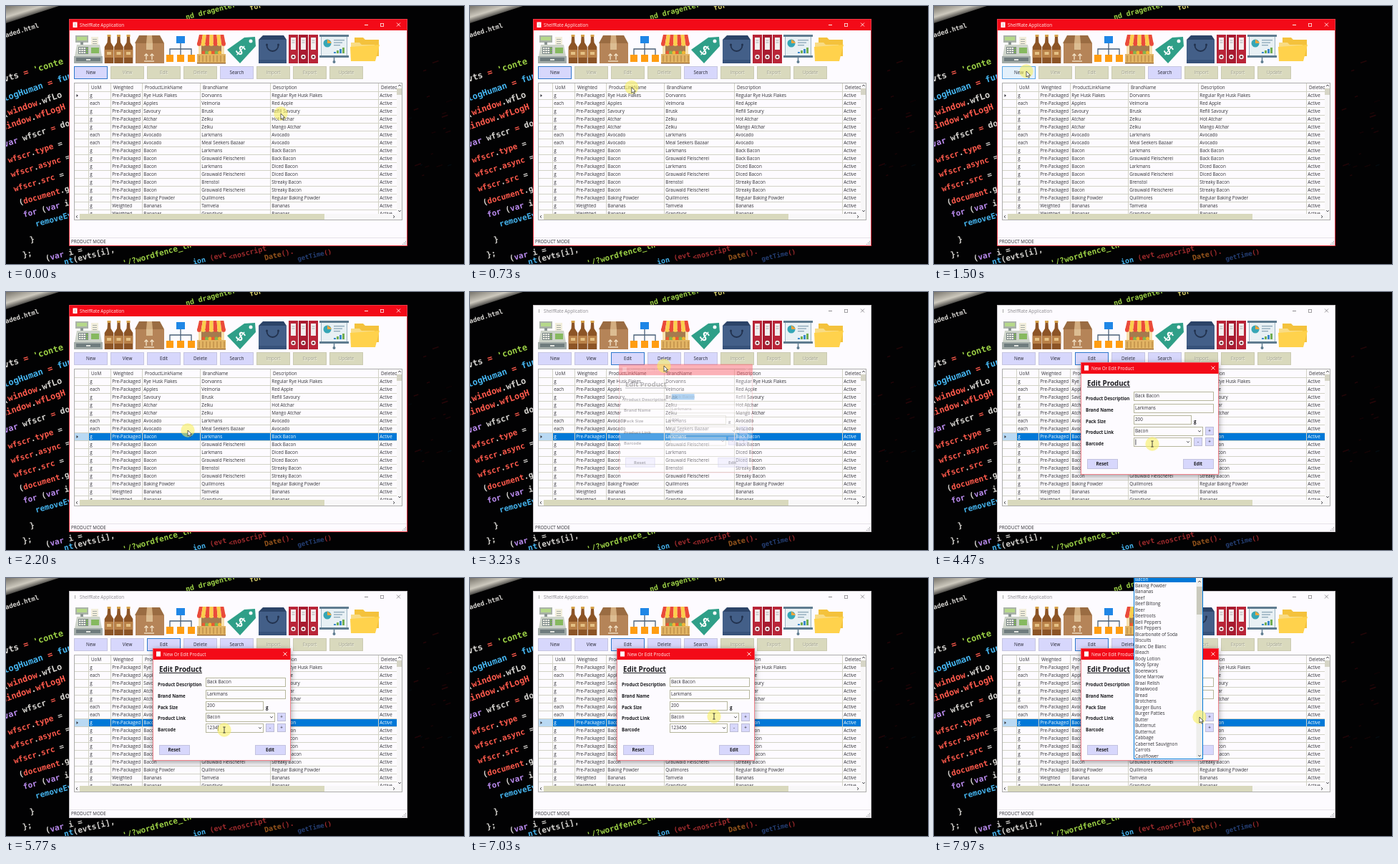
Write an HTML page with a canvas that moves like this. It is 640 by 360 pixels and loops after 8000 ms.

```html
<!DOCTYPE html>
<html lang="en">
<head>
<meta charset="utf-8">
<title>Price list editor</title>
<style>
  html, body { margin: 0; width: 100%; height: 100%; overflow: hidden; background: #020203; }
  canvas { display: block; width: 100vw; height: 100vh; }
</style>
</head>
<body>
<canvas id="stage" width="640" height="360"></canvas>
<script>
const ctx = document.getElementById('stage').getContext('2d');
const LOOP = 8000;
const SANS = '"Open Sans", "Noto Sans", sans-serif';
const MONO = '"DejaVu Sans Mono", "Noto Sans Mono", monospace';
const INK = '#303034', WHITE = '#fdfbff', RED = '#f30a18', LILAC = '#d7d7fc',
      KHAKI = '#d9d9bd', LINE = '#d2d2c6', BLUE = '#0078d7';

const T = { rowClick: 2120, editClick: 3080, dialog: 3150, fieldClick: 4330,
            type: 4900, key: 220, listOpen: 7660 };

// Pointer stops: time, x, y
const PATH = [
  [0, 384, 150], [150, 384, 150], [1150, 129, 91], [1560, 129, 91], [2040, 254, 193],
  [2400, 254, 193], [2850, 226, 94], [3120, 226, 94], [3230, 271, 103], [3600, 300, 150],
  [4200, 305, 212], [6550, 305, 212], [7030, 341, 193], [7400, 371, 194], [8000, 371, 194]
];

function box(x, y, w, h, color) {
  ctx.fillStyle = color;
  ctx.fillRect(x, y, w, h);
}
function frame(x, y, w, h, color, width = 1) {
  ctx.strokeStyle = color;
  ctx.lineWidth = width;
  ctx.strokeRect(x + width / 2, y + width / 2, w - width, h - width);
}
function shape(color, ...pts) {
  ctx.fillStyle = color;
  ctx.beginPath();
  for (let i = 0; i < pts.length; i += 2) ctx.lineTo(pts[i], pts[i + 1]);
  ctx.fill();
}
function line(color, width, ...pts) {
  ctx.strokeStyle = color;
  ctx.lineWidth = width;
  ctx.beginPath();
  for (let i = 0; i < pts.length; i += 2) ctx.lineTo(pts[i], pts[i + 1]);
  ctx.stroke();
}
function disc(x, y, r, color) {
  ctx.fillStyle = color;
  ctx.beginPath();
  ctx.arc(x, y, r, 0, 7);
  ctx.fill();
}
// y is the middle of the capitals
function text(str, x, y, color = INK, size = 6.3, weight = 400, align = 'left') {
  ctx.font = `${weight} ${size}px ${SANS}`;
  ctx.textAlign = align;
  ctx.fillStyle = color;
  ctx.fillText(str, x, y + size * 0.36);
}
function clipped(x, y, w, h, draw) {
  ctx.save();
  ctx.beginPath();
  ctx.rect(x, y, w, h);
  ctx.clip();
  draw();
  ctx.restore();
}
const inside = (p, x, y, w, h) => p.x >= x && p.x < x + w && p.y >= y && p.y < y + h;

function pointerAt(t) {
  let i = 1;
  while (i < PATH.length - 1 && PATH[i][0] < t) i++;
  const [t0, x0, y0] = PATH[i - 1], [t1, x1, y1] = PATH[i];
  const k = (t - t0) / (t1 - t0), e = k * k * (3 - 2 * k);
  return { x: x0 + (x1 - x0) * e, y: y0 + (y1 - y0) * e };
}

// Tilted code on a dark screen
const C = { w: '#d6d4d0', p: '#ff5a4c', c: '#45b4ee', l: '#bb8cf0', g: '#9bcf45',
            y: '#d8d06a', r: '#9c2a2c', o: '#94541c', b: '#253f74' };
const CODE = [
  [0, 44, 9, -.3, 'w', 'aded.html'],
  [-2, 106, 12, -.3, 'w', 'vts ', 'p', '= ', 'g', "'conte"],
  [-2, 133, 12, -.33, 'c', 'logHuman ', 'p', '= ', 'c', 'fun'],
  [-3, 155, 12, -.33, 'w', '(', 'p', 'window', 'w', '.wfLo'],
  [-5, 174, 12, -.33, 'p', 'window', 'w', '.', 'p', 'wfLogH'],
  [-2, 197, 11.5, -.32, 'l', 'var ', 'w', 'wfscr ', 'p', '= ', 'w', 'doc'],
  [4, 219, 11, -.31, 'p', 'wfscr', 'w', '.', 'p', 'type ', 'w', '= '],
  [8, 239, 11, -.3, 'p', 'wfscr', 'w', '.', 'p', 'async ', 'w', '='],
  [12, 259, 11, -.29, 'p', 'wfscr', 'w', '.', 'p', 'src ', 'w', '='],
  [19, 278, 11, -.28, 'w', '(', 'p', 'document', 'w', '.get'],
  [25, 295, 11, -.26, 'l', 'for ', 'w', '(', 'l', 'var ', 'w', 'i ='],
  [42, 308, 11, -.26, 'c', 'removeEvent'],
  [34, 330, 11, -.22, 'w', '}'],
  [24, 351, 11, -.22, 'w', '};'],
  [56, 356, 11, -.24, 'w', '(', 'l', 'var ', 'w', 'i ='],
  [82, 361, 11, -.25, 'c', 'nt', 'w', '(evts[i], '],
  [164, 363, 11, -.27, 'g', "'/?wordfence_lh="],
  [262, 361, 10, -.24, 'c', 'ion ', 'r', '(evt'],
  [312, 354, 10, -.24, 'r', '<noscript'],
  [362, 355, 10, -.24, 'o', "Date", 'r', '().'],
  [408, 356, 9, -.22, 'b', 'getTime', 'r', '()'],
  [252, 19, 10, -.25, 'g', 'nd dragenter'],
  [341, 6, 10, -.22, 'y', 'for']
];
function drawBackdrop() {
  box(0, 0, 640, 360, '#020203');
  const glow = ctx.createLinearGradient(0, 0, 8, 26);
  glow.addColorStop(0, '#77736a');
  glow.addColorStop(.55, '#cdc9be');
  glow.addColorStop(1, '#020203');
  shape(glow, 0, 0, 74, 0, 0, 24);
  ctx.textAlign = 'left';
  for (const [x, y, size, turn, ...parts] of CODE) {
    ctx.save();
    ctx.translate(x, y);
    ctx.rotate(turn);
    ctx.font = `700 ${size}px ${MONO}`;
    let dx = 0;
    for (let i = 0; i < parts.length; i += 2) {
      ctx.fillStyle = C[parts[i]];
      ctx.fillText(parts[i + 1], dx, 0);
      dx += ctx.measureText(parts[i + 1]).width;
    }
    ctx.restore();
  }
  let seed = 11;
  const rnd = () => (seed = seed * 16807 % 2147483647) / 2147483647;
  for (let i = 0; i < 18; i++) {
    const x = 562 + rnd() * 55, y = 75 + rnd() * 185, w = 3 + rnd() * 6;
    line(`rgba(${i % 6 ? '130,18,24' : '24,75,105'},${.08 + rnd() * .22})`, 1.6, x, y, x + w, y - w * .35);
  }
}

function drawRegister() {
  box(97, 41, 18, 10, '#aab3a8');
  box(99, 43, 14, 5, '#b5d88a');
  box(104, 50, 4, 5, '#8b9592');
  box(119, 43, 10, 14, '#f2eedc');
  for (let i = 0; i < 4; i++) box(121, 46 + i * 3, 6, 1, '#a7aca6');
  shape('#ced4ca', 99, 54, 131, 54, 134, 70, 96, 70);
  box(101, 57, 14, 10, '#7c8888');
  for (let i = 0; i < 12; i++)
    box(102 + i % 4 * 3.3, 58 + (i >> 2) * 3, 2.4, 2, i % 4 == 3 ? '#82bd55' : '#f2f2e8');
  box(119, 58, 11, 8, '#86b95f');
  box(95, 70, 40, 10, '#a2aba8');
  box(98, 72, 34, 5, '#6f7c7e');
  box(112, 74, 6, 2, '#e2e4df');
}
function drawBottles() {
  for (let i = 0; i < 3; i++) {
    const x = 144 + i * 13.5;
    box(x - 2.5, 40, 5, 3, '#d6a24a');
    shape('#8c5426', x - 2, 43, x + 2, 43, x + 2.5, 51, x + 6.3, 57, x + 6.3, 80, x - 6.3, 80, x - 6.3, 57, x - 2.5, 51);
    box(x - 6.3, 61, 12.6, 11, '#b98148');
    box(x - 3, 64, 6, 4, '#e4c084');
  }
}
function drawCarton() {
  shape('#9a6c42', 186, 41, 215, 41, 221, 52, 180, 52);
  box(181, 52, 40, 28, '#b58458');
  shape('#d3ae80', 197, 41, 204, 41, 205, 52, 196, 52);
  box(196, 52, 9, 9, '#dcbd92');
  for (const x of [196, 204]) {
    line('#f5e6cc', 1.3, x, 75, x, 67);
    line('#f5e6cc', 1.3, x - 2.5, 69.5, x, 67, x + 2.5, 69.5);
  }
  line('#f5e6cc', 1.3, 193, 77, 207, 77);
}
function drawChart() {
  line('#4a6078', 1.3, 244, 52, 244, 69);
  line('#4a6078', 1.3, 229, 69, 229, 60, 259, 60, 259, 69);
  box(238, 42, 12, 10, '#1f86e6');
  for (const x of [224, 239, 254]) box(x, 68, 10, 10, '#ff9d12');
}
function drawStall() {
  box(269, 51, 36, 29, '#f6e0ac');
  box(273, 55, 28, 13, '#a57a4e');
  for (let i = 0; i < 6; i++) disc(276 + i * 4.5, 65, 2.5, ['#eb5a32', '#86b44f', '#f2b632'][i % 3]);
  for (let i = 0; i < 7; i++) {
    const x = 267 + i * 5.7, color = i % 2 ? '#fbce4c' : '#ea4a3a';
    shape(color, 270 + i * 4.9, 40, 274.9 + i * 4.9, 40, x + 5.7, 53, x, 53);
    disc(x + 2.85, 53, 2.85, color);
  }
  box(267, 67, 40, 12, '#e2b464');
  for (let x = 270; x < 306; x += 5) line('#b07f3c', 1, x, 69, x, 78);
  box(267, 79, 40, 1.5, '#9c6c34');
}
function drawTag() {
  shape('#2f9f88', 309, 61, 333, 44, 348, 43, 349, 56, 327, 80);
  disc(342, 49, 2.5, WHITE);
  ctx.save();
  ctx.translate(328, 62);
  ctx.rotate(.7);
  text('$', 0, 0, '#fff', 20, 600, 'center');
  ctx.restore();
}
function drawBag() {
  box(353, 47, 39, 33, '#435f88');
  shape('#2c4468', 353, 47, 359, 41, 388, 41, 392, 47);
  box(353, 75, 39, 5, '#37527a');
  ctx.strokeStyle = '#22324e';
  ctx.lineWidth = 1.8;
  ctx.beginPath();
  ctx.arc(372.5, 55, 8, 0, Math.PI);
  ctx.stroke();
  disc(364.5, 54, 1.5, '#22324e');
  disc(380.5, 54, 1.5, '#22324e');
}
function drawBinders() {
  for (let i = 0; i < 3; i++) {
    const x = 395 + i * 14;
    box(x, 40, 13, 40, i == 1 ? '#a81b30' : '#b92538');
    box(x + 3, 44, 7, 17, '#f2eeee');
    line('#9b9b9f', .8, x + 4.5, 48, x + 8.5, 48);
    line('#9b9b9f', .8, x + 4.5, 51, x + 8.5, 51);
    disc(x + 6.5, 71, 3.2, '#f2eeee');
    disc(x + 6.5, 71, 1.6, '#69242b');
  }
}
function drawBoard() {
  box(440, 42, 37, 28, '#e8f0f4');
  frame(440, 42, 37, 28, '#9cb4c2', 1);
  box(438, 40, 41, 3, '#5f7c90');
  box(438, 69, 41, 3, '#5f7c90');
  disc(449, 52, 5.5, '#36a6b5');
  shape('#f1a43b', 449, 52, 449, 46.5, 454, 50, 454.5, 52);
  for (let i = 0; i < 3; i++) box(458, 47 + i * 3.5, 15 - i * 3, 1.3, '#8ba6b7');
  for (let i = 0; i < 4; i++) box(458 + i * 4, 66 - 2 * (i + 1), 3, 2 * (i + 1), i % 2 ? '#72ae52' : '#3c8bcc');
  line('#5f7c90', 1.5, 458.5, 72, 458.5, 78);
  disc(458.5, 78, 2, '#5f7c90');
}
function drawFolders() {
  shape('#f4c23c', 487, 44, 499, 44, 502, 47, 521, 47, 521, 70, 487, 70);
  shape('#f9dc84', 482, 51, 494, 51, 497, 54, 515, 54, 515, 77, 482, 77);
  shape('#ffd24c', 481, 57, 522, 54, 516, 77, 482, 77);
}

const BUTTONS = ['New', 'View', 'Edit', 'Delete', 'Search', 'Import', 'Export', 'Update'];
function drawButtons(s) {
  BUTTONS.forEach((name, i) => {
    const x = 95 + i * 51;
    const on = i == 0 || i == 4 || (s.selected && i < 4);
    const hover = on && !s.dialog && inside(s.p, x, 84, 47, 18);
    const focus = s.edited ? i == 2 : !s.selected && i == 0;
    box(x, 84, 47, 18, hover ? '#e3f0fb' : on ? LILAC : KHAKI);
    frame(x, 84, 47, 18, hover ? '#5aa6e4' : focus ? '#2f78cc' : on ? '#c6c6e0' : '#cbcbb2');
    if (!on) text(name, x + 24, 93.7, '#f8f8e8', 6.3, 400, 'center');
    text(name, x + 23.5, 93.2, on ? '#242430' : '#a3a398', 6.3, 400, 'center');
  });
}

const COLS = [115, 146, 190, 271, 369, 520];
const HEADS = ['UoM', 'Weighted', 'ProductLinkName', 'BrandName', 'Description', 'Deleted'];
const ROWS = `g|Rye Husk Flakes|Dorvanns|Regular Rye Husk Flakes
each|Apples|Velmoria|Red Apple
g|Savoury|Brusk|Refill Savoury
g|Atchar|Zelku|Hot Atchar
g|Atchar|Zelku|Mango Atchar
each|Avocado|Larkmans|Avocado
each|Avocado|Meal Seekers Bazaar|Avocado
g|Bacon|Larkmans|Back Bacon
g|Bacon|Grauwald Fleischerei|Back Bacon
g|Bacon|Larkmans|Diced Bacon
g|Bacon|Grauwald Fleischerei|Diced Bacon
g|Bacon|Brenstol|Streaky Bacon
g|Bacon|Grauwald Fleischerei|Streaky Bacon
g|Baking Powder|Quillmores|Regular Baking Powder
g|Bananas|Tamvela|Bananas
g|Bananas|Grandivos|Bananas`.split('\n').map(r => r.split('|'));

function chevron(x, y, dx, dy) {
  line('#55555a', 1, x - dx - dy * 1.8, y - dy - dx * 1.8, x + dx, y + dy, x - dx + dy * 1.8, y - dy + dx * 1.8);
}
function drawGrid(s) {
  box(95, 107, 459, 192, WHITE);
  clipped(95, 107, 451, 183, () => {
    HEADS.forEach((h, i) => text(h, COLS[i] + 4, 113.3));
    ROWS.forEach(([unit, link, brand, desc], i) => {
      const y = 119 + i * 11, picked = s.selected && i == 7;
      if (picked) {
        box(95, y, 20, 11, '#b9d9f3');
        box(115, y, 431, 11, BLUE);
      }
      const cells = [unit, i < 14 ? 'Pre-Packaged' : 'Weighted', link, brand, desc, 'Active'];
      cells.forEach((c, n) => text(c, COLS[n] + 2.3, y + 5.9, picked ? '#fff' : INK));
      box(95, y, 451, 1, LINE);
    });
    for (const x of COLS) box(x, 107, 1, 183, LINE);
    const y = s.selected ? 202 : 125;
    shape('#33333a', 98.5, y - 2, 101, y, 98.5, y + 2);
  });
  box(546, 107, 8, 192, '#f8f7f8');
  box(95, 290, 459, 9, '#f8f7f8');
  box(546, 115, 8, 9, '#d6d5c6');
  box(103, 290, 342, 8, KHAKI);
  chevron(550, 111, 0, -1);
  chevron(550, 286, 0, 1);
  chevron(99, 294, -1, 0);
  chevron(542, 294, 1, 0);
  frame(95, 107, 459, 192, '#adadac');
}

function drawWindow(s) {
  const bar = s.dialog ? WHITE : RED, ink = s.dialog ? '#8c8a8e' : '#fff0ec';
  box(88, 18, 473, 317, WHITE);
  box(88, 18, 473, 16, bar);
  frame(88, 18, 473, 317, s.dialog ? '#c9c5c9' : '#ec3a48');
  box(93.5, 22.5, 6, 7.5, '#fff');
  box(96, 24, 1, 5, s.dialog ? '#a5a3a7' : '#e8a0a0');
  text('ShelfRate Application', 103, 26.5, ink, 6.3);
  box(501, 26, 5, 1, ink);
  frame(523, 24, 5, 5, ink, .8);
  line(ink, .9, 546, 23.5, 551, 28.5);
  line(ink, .9, 551, 23.5, 546, 28.5);
  for (const icon of [drawRegister, drawBottles, drawCarton, drawChart, drawStall,
                      drawTag, drawBag, drawBinders, drawBoard, drawFolders]) icon();
  drawButtons(s);
  drawGrid(s);
  box(89, 323, 471, 1, '#e6e3e8');
  text('PRODUCT MODE', 91, 329, INK, 6.2);
  for (let i = 0; i < 3; i++)
    for (let j = 0; j <= i; j++) box(558 - j * 2, 328 + i * 2, 1, 1, '#88888c');
}

function field(y, w, value, combo) {
  box(279, y, w, 13, WHITE);
  frame(279, y, w, 13, '#b6b69c');
  text(value, 281, y + 6.2);
  if (combo) chevron(279 + w - 5, y + 6.2, 0, 1);
}
function smallButton(x, y, sign) {
  box(x, y, 12, 12, LILAC);
  frame(x, y, 12, 12, '#bdbdd4');
  text(sign, x + 6, y + 5.8, '#222', 6.2, 400, 'center');
}
function drawDialog(s, t) {
  const k = Math.min(1, (t - T.dialog) / 260), z = .95 + .05 * k;
  ctx.save();
  ctx.globalAlpha = k;
  ctx.translate(301.5, 176.5);
  ctx.scale(z, z);
  ctx.translate(-301.5, -176.5);
  if (k == 1) {
    ctx.shadowColor = 'rgba(0,0,0,.4)';
    ctx.shadowBlur = 8;
    ctx.shadowOffsetY = 2;
  }
  box(205, 98, 193, 157, WHITE);
  ctx.shadowColor = 'transparent';
  box(205, 98, 193, 16, RED);
  frame(205, 98, 193, 157, '#f06570', .8);
  box(210, 102.5, 6, 7, '#fff');
  text('New Or Edit Product', 220, 106.5, '#fff0ec', 6.3);
  line('#fff0ec', .9, 387.5, 103.5, 392.5, 108.5);
  line('#fff0ec', .9, 392.5, 103.5, 387.5, 108.5);
  text('Edit Product', 214, 127, '#1c1c20', 9.8, 700);
  box(214, 132, 60, 1, '#1c1c20');
  ['Product Description', 'Brand Name', 'Pack Size', 'Product Link', 'Barcode']
    .forEach((name, i) => text(name, 212, 148.5 + i * 15.9, '#1c1c20', 6.2, 700));
  field(139, 112, 'Back Bacon');
  if (t < T.fieldClick) {
    box(281, 141, 33, 8.5, BLUE);
    text('Back Bacon', 281, 145.2, '#fff');
  }
  field(156, 112, 'Larkmans');
  field(172, 81, '200');
  text('g', 363, 180.5, '#1c1c20', 6.2, 700);
  field(188, 97, 'Bacon', true);
  smallButton(379, 188, '+');
  const count = Math.max(0, Math.min(6, Math.floor((t - T.type) / T.key) + 1));
  const digits = '123456'.slice(0, count);
  field(203, 81, digits, true);
  if (t > T.fieldClick && t < T.listOpen && (t - T.fieldClick) % 1060 < 530) {
    const x = 281.5 + ctx.measureText(digits).width;
    box(x, 205.5, .8, 8, '#222');
  }
  smallButton(363, 203, '-');
  smallButton(379, 203, '+');
  for (const [name, x] of [['Reset', 214], ['Edit', 348]]) {
    box(x, 233, 43, 14, LILAC);
    frame(x, 233, 43, 14, '#c3c3df');
    text(name, x + 21, 240, '#1c1c20', 6.2, 700, 'center');
  }
  ctx.restore();
}

const LINKS = ('Bacon,Baking Powder,Bananas,Beef,Beef Biltong,Beer,Beetroots,Bell Peppers,Bell Peppers,' +
  'Bicarbonate of Soda,Biscuits,Blanc De Blanc,Bleach,Body Lotion,Body Spray,Boerewors,Bone Marrow,' +
  'Braai Relish,Braaiwood,Bread,Brotchens,Burger Buns,Burger Patties,Butter,Butternut,Butternut,' +
  'Cabbage,Cabernet Sauvignon,Carrots,Cauliflower').split(',');
function drawList() {
  box(279, -2, 97, 255, WHITE);
  box(280, -2, 86, 8, BLUE);
  LINKS.forEach((name, i) => text(name, 281, 2 + i * 8.5, i ? INK : '#fff'));
  box(366.5, 0, 9, 252, '#eeeeec');
  box(367, 12, 8, 39, '#c9c9bd');
  chevron(371, 5, 0, -1);
  chevron(371, 248, 0, 1);
  frame(279, -2, 97, 255, BLUE);
}

function drawPointer(s) {
  const { x, y } = s.p;
  disc(x, y, 9.7, 'rgba(248,239,92,.58)');
  const overText = s.dialog && !s.list &&
    (inside(s.p, 279, 188, 87, 13) || inside(s.p, 279, 203, 71, 13) || inside(s.p, 279, 139, 112, 30));
  if (overText) {
    line('#333', .9, x, y - 4, x, y + 4);
    line('#333', .9, x - 1.7, y - 4, x + 1.7, y - 4);
    line('#333', .9, x - 1.7, y + 4, x + 1.7, y + 4);
    return;
  }
  const outline = [0, 0, 0, 8, 1.8, 6.4, 3.1, 9.2, 4.5, 8.5, 3.2, 5.8, 5.7, 5.8, 0, 0]
    .map((v, i) => v + (i % 2 ? y : x));
  shape('#fff', ...outline);
  line('#222', .7, ...outline);
}

function draw(now) {
  const t = now % LOOP;
  const s = {
    p: pointerAt(t), selected: t >= T.rowClick, edited: t >= T.editClick,
    dialog: t >= T.dialog, list: t >= T.listOpen
  };
  drawBackdrop();
  drawWindow(s);
  if (s.dialog) drawDialog(s, t);
  if (s.list) drawList();
  drawPointer(s);
}

const start = performance.now();
function tick() {
  draw(performance.now() - start);
  requestAnimationFrame(tick);
}
tick();
</script>
</body>
</html>
```
